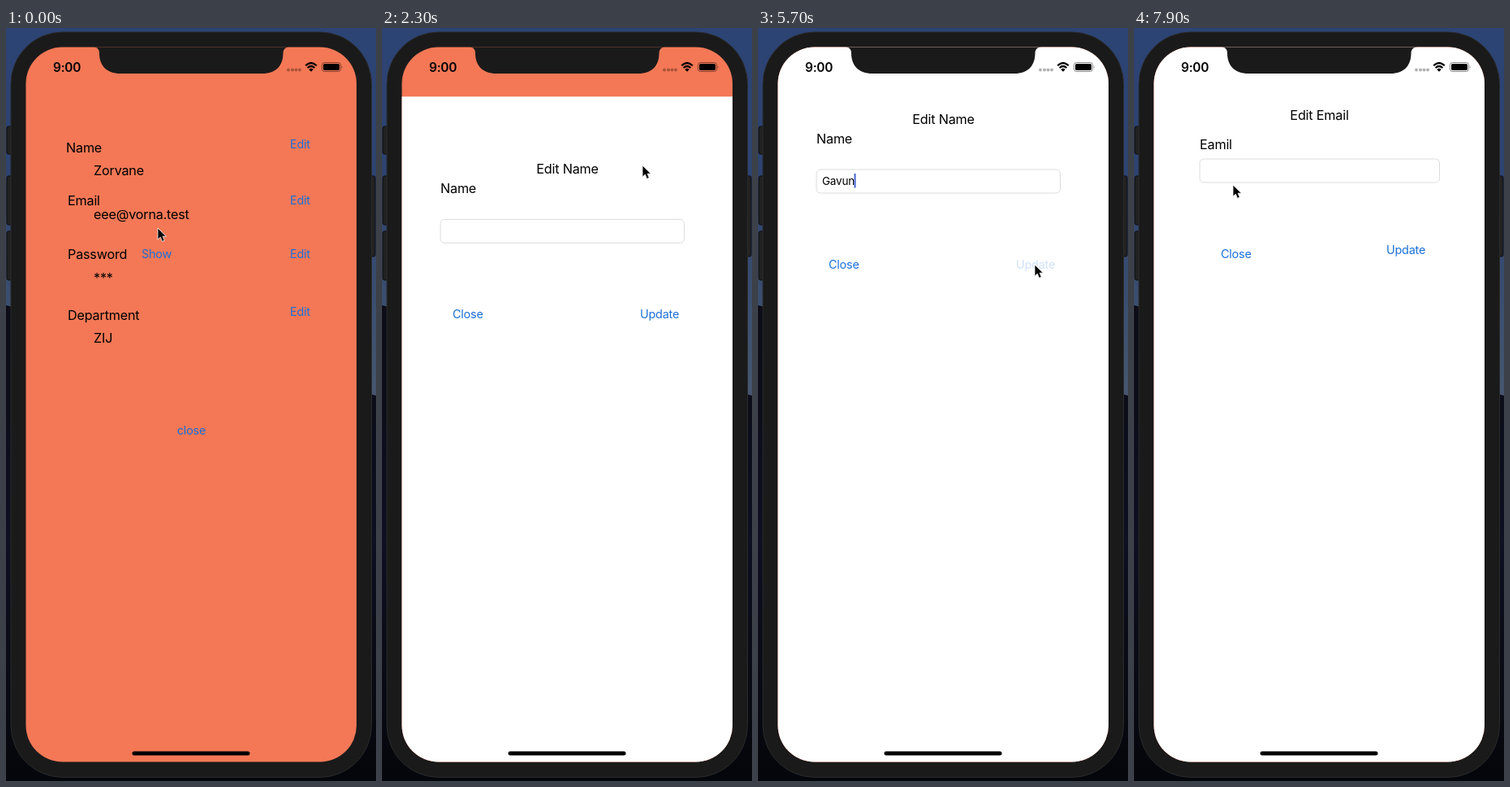
These frames come from a looping animation (456 by 926 pixels, 8 s). An HTML page:

```html
<!DOCTYPE html>
<html lang="en">
<head>
<meta charset="utf-8">
<title>Profile editing</title>
<style>
  html, body { margin: 0; width: 100%; height: 100%; overflow: hidden; background: #06070d; }
  svg { display: block; width: 456px; height: 926px; }
  text { font: 16.2px Inter, sans-serif; letter-spacing: -.2px; white-space: pre; }
  .button { font-size: 14.4px; fill: #1a70d8; }
  .mid { text-anchor: middle; }
  .clock { font-size: 15.4px; font-weight: 600; }
  #typed { font-size: 13.5px; }
  .field { fill: #fff; stroke: #dcdcdc; }
</style>
</head>
<body>
<svg viewBox="0 0 456 926">
  <defs>
    <linearGradient id="sky" x2="0" y2="1">
      <stop stop-color="#2c4474"/>
      <stop offset=".2" stop-color="#2d4370"/>
      <stop offset=".48" stop-color="#46566f"/>
    </linearGradient>
    <linearGradient id="ground" x2="0" y2="1">
      <stop stop-color="#0b0c15"/>
      <stop offset=".5" stop-color="#0e0f1f"/>
      <stop offset="1" stop-color="#05060b"/>
    </linearGradient>
    <clipPath id="screen"><rect x="24.5" y="23.5" width="407.5" height="879" rx="45"/></clipPath>
  </defs>

  <rect width="456" height="926" fill="url(#sky)"/>
  <path d="M0 341L456 452V926H0Z" fill="url(#ground)"/>
  <g fill="#222" stroke="#0c0c0e">
    <rect x="1" y="121" width="8" height="34" rx="2"/>
    <rect x="1" y="182" width="8" height="60" rx="2"/>
    <rect x="1" y="250" width="8" height="60" rx="2"/>
    <rect x="447" y="182" width="8" height="99" rx="2"/>
  </g>
  <rect x="6" y="5" width="444.500" height="916.500" rx="64" fill="#1a1a1a" stroke="#292a2c"/>

  <g clip-path="url(#screen)">
    <rect x="24" y="23" width="409" height="880" fill="#f47856"/>
    <g id="profile"></g>
    <g id="nameSheet"></g>
    <g id="emailSheet"></g>
    <path d="M108 23Q115 24 115 31C115 46 124 56 141 56H316C333 56 341.500 46 341.500 31Q341.500 24 349 23Z" fill="#1a1a1a"/>
    <text class="clock" x="58" y="53.500">9:00</text>
    <g opacity=".3">
      <circle cx="348" cy="51.500" r="2"/><circle cx="353" cy="51.500" r="2"/>
      <circle cx="357.500" cy="51.500" r="2"/><circle cx="362" cy="51.500" r="2"/>
    </g>
    <path d="M369.200 46.300Q376 39.700 382.800 46.300M371.600 49Q376 45 380.400 49" fill="none" stroke="#000" stroke-width="2.200"/>
    <path d="M373.300 50.900Q376 48.700 378.700 50.900L376 53.700Z"/>
    <rect x="389.500" y="42.500" width="23" height="11" rx="3" fill="none" stroke="#000" stroke-opacity=".45"/>
    <rect x="391" y="44" width="20" height="8" rx="1.800"/>
    <path d="M413.800 46Q415.600 48 413.800 50Z" opacity=".5"/>
    <rect x="155.500" y="889.500" width="145" height="5" rx="2.500"/>
  </g>
  <path id="cursor" d="M0 0V14.200L3.300 11.200L5.500 16.400L8.300 15.200L6.100 10.200H10.500Z" stroke="#fff" stroke-width=".8"/>
</svg>
<script>
const $ = id => document.getElementById(id);
const label = (x, y, text, id = '', cls = '') => `<text id="${id}" class="${cls}" x="${x}" y="${y}">${text}</text>`;
const button = (x, y, text, id, cls = '') => label(x, y, text, id, 'button ' + cls);
const sheet = '<rect x="24" y="23" width="409" height="885" fill="#fff"/>';
const field = (x, y, w) => `<rect class="field" x="${x}" y="${y}" width="${w}" height="29" rx="5"/>`;

$('profile').innerHTML =
  label(74, 153, 'Name') + label(108, 181, '', 'nameValue') + button(350, 148, 'Edit', 'editName') +
  label(76, 217.5, 'Email') + label(108, 235, 'eee@vorna.test') + button(350, 216.5, 'Edit', 'editEmail') +
  label(76, 284, 'Password') + label(108, 313, '***') + button(167, 283, 'Show', 'show') + button(350, 283, 'Edit') +
  label(76, 359, 'Department') + label(108, 387, 'ZIJ') + button(350, 354, 'Edit') +
  button(228.5, 500, 'close', '', 'mid');

$('nameSheet').innerHTML = sheet +
  label(228.5, 117.5, 'Edit Name', '', 'mid') + label(72, 142, 'Name') + field(72, 174, 300.5) +
  label(79, 193, '', 'typed') + '<rect id="caret" y="179" width="2" height="17.500" fill="#4664d4"/>' +
  button(87, 296, 'Close') + button(318, 296, 'Update', 'update');

$('emailSheet').innerHTML = sheet +
  label(228.5, 112.5, 'Edit Email', '', 'mid') + label(81, 148.5, 'Eamil') + field(81, 161, 295.5) +
  button(107, 283, 'Close') + button(311, 277.5, 'Update');

const LOOP = 8000, HEIGHT = 880, OLD_NAME = 'Zorvane', NEW_NAME = 'Gavun';
const keyTimes = [3700, 3900, 4200, 4300, 4500];
const path = [ // time, x, y
  [0, 187, 246], [900, 184, 276], [1220, 184, 276], [1500, 329, 185], [1780, 360, 146], [2050, 360, 146],
  [2300, 321, 169], [2900, 262, 192], [3050, 262, 192], [3400, 247, 199], [5050, 247, 199], [5500, 341, 291],
  [5750, 341, 291], [6000, 296, 232], [6800, 362, 217], [7200, 365, 219], [7480, 365, 219], [7900, 122, 193]
];
const clamp = v => Math.min(1, Math.max(0, v));

function cursorAt(t) {
  const i = path.findIndex(p => p[0] > t);
  if (i < 0) return path[path.length - 1].slice(1);
  const [t0, x0, y0] = path[i - 1], [t1, x1, y1] = path[i];
  const u = (t - t0) / (t1 - t0), e = u * u * (3 - 2 * u);
  return [x0 + (x1 - x0) * e, y0 + (y1 - y0) * e];
}

// Remaining share of a critically damped slide
function spring(t, start) {
  const u = Math.max(0, t - start) * .018;
  const rest = (1 + u) * Math.exp(-u);
  return rest < .006 ? 0 : rest;
}

// Button dims while held, then fades back
const press = (id, t, down, up) =>
  $(id).setAttribute('opacity', t < down ? 1 : t < up ? .2 : .2 + .8 * clamp((t - up) / 400));

const slide = (id, offset) => $(id).setAttribute('transform', `translate(0 ${offset * HEIGHT})`);

function draw(t) {
  $('nameValue').textContent = t < 5700 ? OLD_NAME : NEW_NAME;
  press('show', t, 1150, 1300);
  press('editName', t, 1850, 2000);
  press('update', t, 5560, 5700);
  press('editEmail', t, 7280, 7450);

  slide('nameSheet', t < 5782 ? spring(t, 2060) : 1 - spring(t, 5782));
  slide('emailSheet', spring(t, 7480));

  const typed = $('typed');
  typed.textContent = NEW_NAME.slice(0, keyTimes.filter(k => t >= k).length);
  $('caret').setAttribute('x', 78.5 + (typed.textContent ? typed.getComputedTextLength() : 0));
  $('caret').setAttribute('opacity', t < 3400 ? 0 : t < 5050 ? 1 - clamp((t - 4550) / 150) : 1);

  $('cursor').setAttribute('transform', `translate(${cursorAt(t)})`);
}

function tick() {
  draw(performance.now() % LOOP);
  requestAnimationFrame(tick);
}
tick();
</script>
</body>
</html>
```
